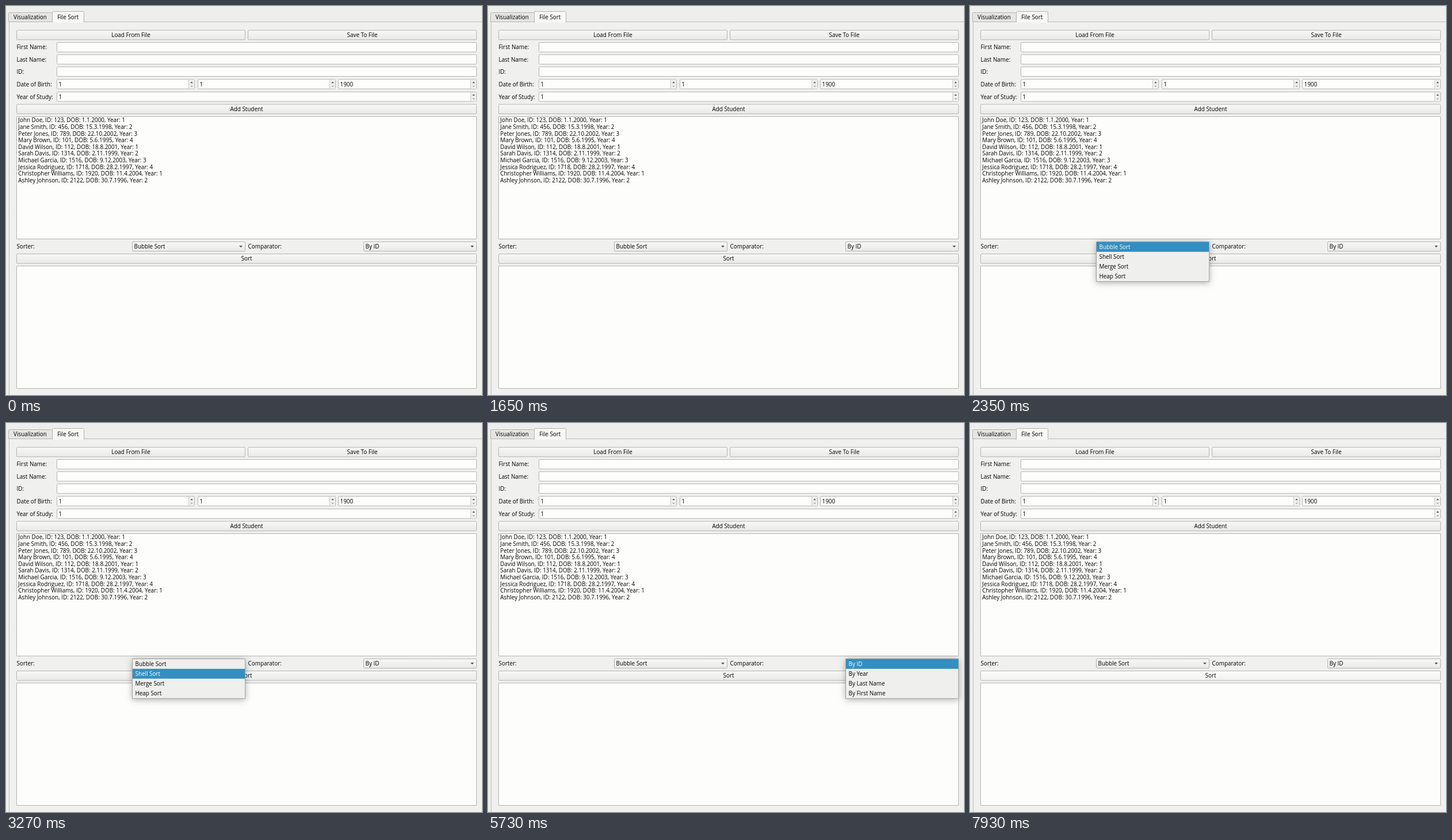
Write an HTML page with a canvas that moves like this. It is 827 px wide and 677 px high and loops after 8000 ms.

```html
<!DOCTYPE html>
<html lang="en">
<head>
<meta charset="utf-8">
<title>File Sort</title>
<style>
  html, body { margin: 0; width: 100%; height: 100%; overflow: hidden; background: #eeeeed; }
  canvas { display: block; }
</style>
</head>
<body>
<canvas id="stage" width="827" height="677"></canvas>
<script>
const ctx = document.getElementById('stage').getContext('2d');
const LOOP = 8000, ROW = 17.1, HEIGHT = 17.5;
const BORDER = '#b4b4b0', FIELD = '#fdfdfb', INK = '#000';

const sorters = ['Bubble Sort', 'Shell Sort', 'Merge Sort', 'Heap Sort'];
const comparators = ['By ID', 'By Year', 'By Last Name', 'By First Name'];
const students = [
  'John Doe, ID: 123, DOB: 1.1.2000, Year: 1',
  'Jane Smith, ID: 456, DOB: 15.3.1998, Year: 2',
  'Peter Jones, ID: 789, DOB: 22.10.2002, Year: 3',
  'Mary Brown, ID: 101, DOB: 5.6.1995, Year: 4',
  'David Wilson, ID: 112, DOB: 18.8.2001, Year: 1',
  'Sarah Davis, ID: 1314, DOB: 2.11.1999, Year: 2',
  'Michael Garcia, ID: 1516, DOB: 9.12.2003, Year: 3',
  'Jessica Rodriguez, ID: 1718, DOB: 28.2.1997, Year: 4',
  'Christopher Williams, ID: 1920, DOB: 11.4.2004, Year: 1',
  'Ashley Johnson, ID: 2122, DOB: 30.7.1996, Year: 2'
];

const between = (t, from, to) => t >= from && t < to;

function text(str, x, midY, color = INK, align = 'left') {
  ctx.fillStyle = color;
  ctx.textAlign = align;
  ctx.fillText(str, x, midY + 3.6);
}

function box(x, y, w, h, fill, radius = 1.5, stroke = BORDER) {
  ctx.beginPath();
  ctx.roundRect(x + .5, y + .5, w - 1, h - 1, radius);
  ctx.fillStyle = fill;
  ctx.fill();
  ctx.strokeStyle = stroke;
  ctx.stroke();
}

function line(color, ...points) {
  ctx.beginPath();
  for (const [x, y] of points) ctx.lineTo(x, y);
  ctx.strokeStyle = color;
  ctx.stroke();
}

function triangle(x, y, half, height, color) {
  ctx.beginPath();
  ctx.moveTo(x - half, y);
  ctx.lineTo(x + half, y);
  ctx.lineTo(x, y + height);
  ctx.fillStyle = color;
  ctx.fill();
}

function raised(x, y, w, hover) {
  const shade = ctx.createLinearGradient(0, y, 0, y + HEIGHT);
  shade.addColorStop(0, hover ? '#fefefc' : '#f8f8f6');
  shade.addColorStop(1, hover ? '#f1f1ef' : '#e9e9e7');
  box(x, y, w, HEIGHT, shade);
}

function button(label, x, y, w, hover) {
  raised(x, y, w, hover);
  text(label, x + w / 2, y + 8.8, INK, 'center');
}

function combo(value, x, hover) {
  raised(x, 409.8, 197, hover);
  text(value, x + 3.5, 418.8);
  triangle(x + 189, 417, 3, 3.2, '#555');
}

function spin(value, x, y, w) {
  box(x, y, w, HEIGHT, FIELD);
  const right = x + w;
  ctx.fillStyle = '#f1f1ef';
  ctx.fillRect(right - 10, y + 1, 9, HEIGHT - 2);
  line('#c9c9c6', [right - 10.5, y + 1], [right - 10.5, y + HEIGHT - 1]);
  triangle(right - 5.5, y + 7, 2.3, -2.8, '#555');
  triangle(right - 5.5, y + 11.5, 2.3, 2.8, '#aaa');
  text(value, x + 3.5, y + 8.9);
}

function popup(items, x, selected, alpha) {
  ctx.save();
  ctx.globalAlpha = alpha;
  ctx.save();
  ctx.shadowColor = 'rgba(0,0,0,.3)';
  ctx.shadowBlur = 10;
  ctx.shadowOffsetY = 2;
  ctx.fillStyle = '#efefed';
  ctx.fillRect(x, 410, 197, 70);
  ctx.restore();
  box(x, 410, 197, 70, '#efefed', 0, '#a3a3a1');
  items.forEach((item, i) => {
    const active = i === selected;
    if (active) {
      ctx.fillStyle = '#338fc1';
      ctx.fillRect(x + 1, 410.7 + i * ROW, 195, ROW);
    }
    text(item, x + 5.5, 419.4 + i * ROW, active ? '#fff' : INK);
  });
  ctx.restore();
}

function tabs() {
  const edge = '#bcbcc4';
  ctx.fillStyle = '#f0f0ef';
  ctx.fillRect(6, 28, 821, 649);
  line(edge, [827, 27.5], [5.5, 27.5], [5.5, 677]);
  box(4, 11, 77, 17, '#e5e5e3', [2, 2, 0, 0]);
  box(80, 9, 56, 20, '#f8f8f6', [2, 2, 0, 0]);
  ctx.fillStyle = '#f8f8f6';
  ctx.fillRect(81, 27, 54, 2);
  text('Visualization', 42, 19.6, INK, 'center');
  text('File Sort', 107.8, 19, INK, 'center');
}

function form(t) {
  button('Load From File', 18, 41.7, 398);
  button('Save To File', 420, 41.7, 398);
  ['First Name:', 'Last Name:', 'ID:'].forEach((label, i) => {
    const y = 63 + i * 21.2;
    text(label, 18.5, y + 8.8);
    box(88, y, 730, HEIGHT, FIELD);
  });
  text('Date of Birth:', 18.5, 136.1);
  spin('1', 88, 127.2, 240);
  spin('1', 333, 127.2, 240);
  spin('1900', 577, 127.2, 241);
  text('Year of Study:', 18.5, 158);
  spin('1', 88, 149.1, 730);
  button('Add Student', 18, 170.6, 800);
  box(18, 192, 800, 214, FIELD, 0);
  students.forEach((entry, i) => text(entry, 21.3, 198.6 + i * 11.65));
  text('Sorter:', 18.5, 418.8);
  combo(sorters[0], 219, between(t, 2080, 4480));
  text('Comparator:', 420.5, 418.8);
  combo(comparators[0], 621, between(t, 4900, 7900));
  button('Sort', 18, 431, 800, between(t, 1950, 2080) || t >= 7900);
  box(18, 452, 800, 214, FIELD, 0);
}

function draw(t) {
  ctx.fillStyle = '#eeeeed';
  ctx.fillRect(0, 0, 827, 677);
  ctx.font = '500 9.9px "Open Sans", sans-serif';
  ctx.lineWidth = 1;
  tabs();
  form(t);
  if (between(t, 2350, 4120))
    popup(sorters, 219, between(t, 3270, 3650) ? 1 : 0, t < 4080 ? 1 : .4);
  if (between(t, 5350, 7570))
    popup(comparators, 621, between(t, 7070, 7300) ? 1 : 0, t < 5380 ? .5 : 1);
}

function frame() {
  draw(performance.now() % LOOP);
  requestAnimationFrame(frame);
}
frame();
</script>
</body>
</html>
```
